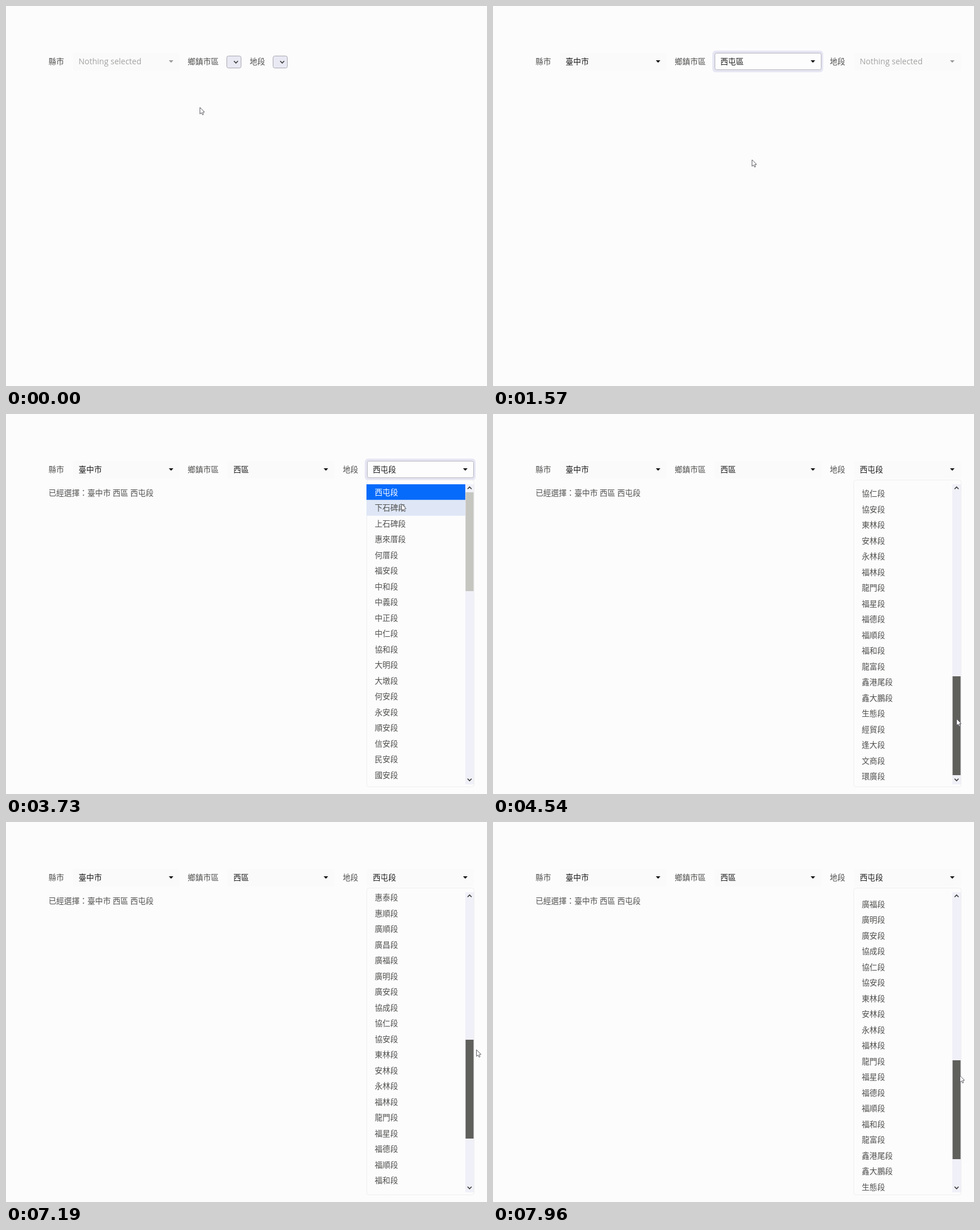
These frames come from a looping animation (842x665 px, 7990 ms). An HTML page with a canvas:

```html
<!DOCTYPE html>
<html lang="zh-Hant">
<head>
<meta charset="utf-8">
<style>
  html, body { margin: 0; width: 100%; height: 100%; overflow: hidden; background: #fcfcfd; }
  canvas { display: block; }
</style>
</head>
<body>
<canvas width="842" height="665"></canvas>
<script>
const ctx = document.querySelector('canvas').getContext('2d');
const LOOP = 7990, ROW = 27.5, LIST_TOP = 123, VISIBLE_ROWS = 19;
const TRACK = 495, DRAG_START = 4000, GRAB_Y = 158, SCROLL_LAG = 30;
const PLACEHOLDER = 'Nothing selected', TEXT = '#50504e';
const CJK = '300 13.6px "Open Sans", "Noto Sans CJK TC", "Noto Sans CJK", sans-serif';
const LATIN = '14px "Open Sans", sans-serif';

const names = (stems, suffix) => stems.split(' ').map(stem => stem + suffix);
const fields = [
  { x: 117, items: names('基隆市 臺北市 新北市 桃園市 新竹市 新竹縣 苗栗縣 臺中市 南投縣 彰化縣 雲林縣 嘉義市 嘉義縣 臺南市 高雄市 屏東縣 宜蘭縣 花蓮縣 臺東縣 澎湖縣 金門縣 連江縣', '') },
  { x: 388, items: names('中 東 西 南 北 西屯 南屯 北屯 豐原 東勢 大甲 清水 沙鹿 梧棲 后里 神岡 潭子 大雅 新社 石岡 外埔 大安 烏日 大肚 龍井 霧峰 太平 大里 和平', '區') },
  { x: 632, items: names('西屯 下石碑 上石碑 惠來厝 何厝 福安 中和 中義 中正 中仁 協和 大明 大墩 何安 永安 順安 信安 民安 國安 ' +
    '上安 上仁 惠民 惠國 惠安 惠泰 惠順 廣順 廣昌 廣福 廣明 廣安 協成 協仁 協安 東林 安林 永林 福林 龍門 福星 福德 福順 福和 ' +
    '龍富 鑫港尾 鑫大鵬 生態 經貿 逢大 文商 環廣', '段') }
];

// One visit to a drop-down: when it opens and closes, and where the pointer goes inside it
const pick = (field, open, close, x, y) =>
  ({ field, open, close, x, y, row: Math.floor((y - LIST_TOP) / ROW) });
const picks = [
  pick(0, 300, 820, 277, 326),
  pick(1, 1180, 1560, 450, 270),
  pick(2, 1760, 2110, 725, 136),
  pick(1, 3010, 3330, 455, 188),
  pick(2, 3570, Infinity, 692, 157)
];

// Pointer moves: to each button, then to the option, then along the scrollbar
const move = (start, end, x, y) => ({ start, end, x, y });
const moves = picks.flatMap((p, i) => [
  move(Math.max(i ? picks[i - 1].close : 30, p.open - 360), p.open, fields[p.field].x + 150, 100),
  move(p.open, p.open + 110 + 50 * p.row, p.x, p.y)
]).concat([
  move(3730, DRAG_START, 811, GRAB_Y),
  move(DRAG_START, 4540, 811, 533),
  move(5670, 5800, 824, 455),
  move(6000, 6365, 826, 310),
  move(6365, 6730, 823, 403),
  move(7130, 7500, 824, 335),
  move(7500, 8040, 816.5, 450)
]);

const clamp = (v, lo, hi) => Math.min(hi, Math.max(lo, v));

function pointerAt(t) {
  let x = 339, y = 177;
  for (const m of moves) {
    const u = clamp((t - m.start) / (m.end - m.start), 0, 1), ease = u * u * (3 - 2 * u);
    x += (m.x - x) * ease;
    y += (m.y - y) * ease;
  }
  return { x, y };
}

function valueAt(field, t) {
  const done = picks.filter(p => p.field === field && p.close <= t).pop();
  if (done) return fields[field].items[done.row];
  return field === 0 || picks.some(p => p.field === field - 1 && p.close <= t) ? PLACEHOLDER : null;
}

function text(str, x, cy, color = TEXT) {
  ctx.font = str === PLACEHOLDER ? LATIN : CJK;
  ctx.fillStyle = color;
  ctx.fillText(str, x, cy + 5);
}

function box(x, y, w, h, r, fill, stroke) {
  ctx.beginPath();
  ctx.roundRect(x, y, w, h, r);
  ctx.fillStyle = fill;
  ctx.fill();
  if (!stroke) return;
  ctx.lineWidth = 1;
  ctx.strokeStyle = stroke;
  ctx.stroke();
}

function chevron(x, y, dir) {
  ctx.beginPath();
  ctx.moveTo(x - 3.5, y - 1.8 * dir);
  ctx.lineTo(x, y + 1.8 * dir);
  ctx.lineTo(x + 3.5, y - 1.8 * dir);
  ctx.lineWidth = 1.6;
  ctx.strokeStyle = '#3a3a3a';
  ctx.stroke();
}

function nativeSelect(x) {
  box(x + .5, 87.5, 25, 21, 3, '#e9e9f4', '#a8a8ae');
  chevron(x + 16.5, 98, 1);
}

function picker(x, value, focused) {
  if (focused) {
    box(x - 4, 78, 194, 38, 6, '#e6e6f3');
    box(x + .5, 82.5, 186, 29, 3, '#fdfdfd', '#b4b4be');
  } else box(x, 82, 187, 31, 4, '#fafafb');
  const empty = value === PLACEHOLDER;
  text(value, x + 10, 97, empty ? '#a2a2a0' : '#1c1c1c');
  ctx.fillStyle = empty ? '#999' : '#111';
  ctx.beginPath();
  ctx.moveTo(x + 168, 95);
  ctx.lineTo(x + 176, 95);
  ctx.lineTo(x + 172, 99.3);
  ctx.fill();
}

function menu({ x: fieldX, items }, selected, dragY, tip) {
  const x = fieldX - 1, dragging = dragY !== null;
  const max = (items.length - VISIBLE_ROWS) * ROW - 2.5;
  const thumb = TRACK * 472 / (472 + max);
  const offset = dragging ? clamp(dragY - GRAB_Y, 0, TRACK - thumb) : 0;
  const scroll = offset / (TRACK - thumb) * max;
  box(x + .5, 115.5, 188, 537, 4, '#fcfcfd', '#eeeeef');
  ctx.save();
  ctx.beginPath();
  ctx.rect(x, LIST_TOP, 188, 525);
  ctx.clip();
  items.forEach((item, i) => {
    const y = LIST_TOP + i * ROW - scroll;
    const active = item === selected;
    const hover = !dragging && tip.x > x && tip.x < x + 173 && tip.y >= y && tip.y < y + ROW;
    if (active || hover) {
      ctx.fillStyle = active ? '#066bfb' : '#dfe7f6';
      ctx.fillRect(x, y, 173, ROW);
    }
    text(item, x + 14.5, y + 13.7, active ? '#fff' : TEXT);
  });
  ctx.fillStyle = '#f0f0f8';
  ctx.fillRect(x + 173, LIST_TOP, 15, 525);
  ctx.fillStyle = dragging ? '#5f5f5c' : '#c6c6c0';
  ctx.fillRect(x + 173.5, Math.round(137 + offset), 14, Math.round(thumb));
  chevron(x + 180.5, 129.5, -1);
  chevron(x + 180.5, 640, 1);
  ctx.restore();
}

function pointer({ x, y }) {
  const arrow = new Path2D('M0 0V11.5L2.7 9.2L4.5 13L6.3 12.2L4.7 8.5L8 8.2Z');
  ctx.save();
  ctx.translate(x + .5, y + .5);
  ctx.fillStyle = '#fff';
  ctx.fill(arrow);
  ctx.lineWidth = 1;
  ctx.strokeStyle = '#5c5c64';
  ctx.stroke(arrow);
  ctx.restore();
}

function draw(t) {
  ctx.fillStyle = '#fcfcfd';
  ctx.fillRect(0, 0, 842, 665);
  const chosen = fields.map((_, i) => valueAt(i, t));
  const current = picks.filter(p => p.open <= t).pop();
  const dragging = t >= DRAG_START;
  const tip = pointerAt(t);
  const wide = chosen[1] !== null;

  text('縣市', 74.5, 97);
  text('鄉鎮市區', 318, 97);
  text('地段', wide ? 589.5 : 426.5, 97);
  chosen.forEach((value, i) => {
    if (value) picker(fields[i].x, value, !dragging && current?.field === i);
    else nativeSelect(i === 1 ? 386 : wide ? 630 : 467);
  });
  if (chosen[2] && chosen[2] !== PLACEHOLDER) text('已經選擇：' + chosen.join(' '), 74.5, 137.5);
  if (current && t < current.close) {
    const dragY = dragging ? pointerAt(t - SCROLL_LAG).y : null;
    menu(fields[current.field], chosen[current.field], dragY, tip);
  }
  pointer(tip);
}

function tick(now) {
  draw(now % LOOP);
  requestAnimationFrame(tick);
}
draw(0);
requestAnimationFrame(tick);
</script>
</body>
</html>
```
